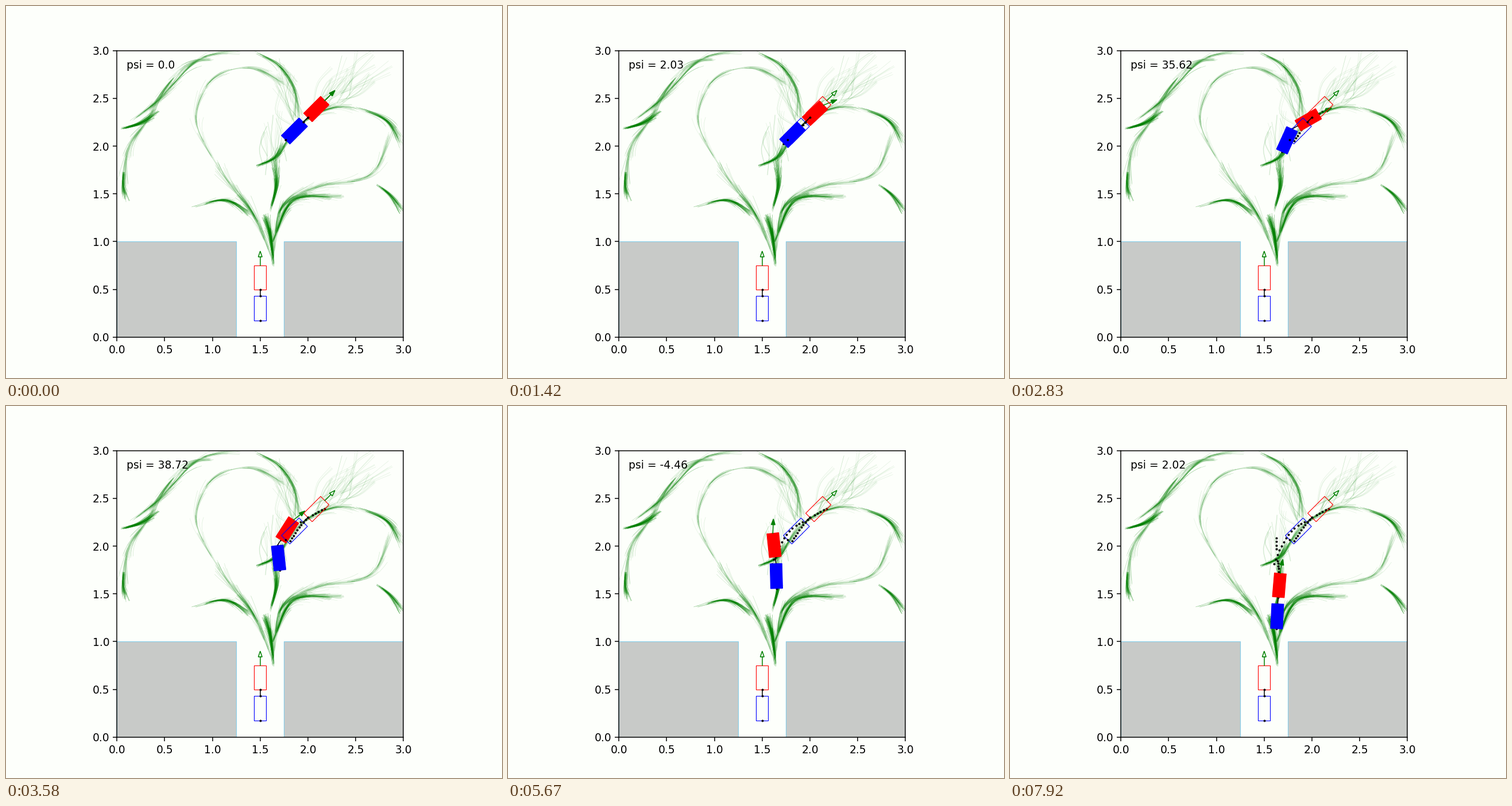
These frames come from a looping animation (864x648 px, 8 s). A matplotlib script:

```python
import numpy as np
import matplotlib.pyplot as plt
from matplotlib.animation import FuncAnimation
from matplotlib.collections import LineCollection
from matplotlib.patches import Polygon, Rectangle

FRAMES = 96
LOOP_MS = 8000
LENGTH, WIDTH = 0.25, 0.125
HITCH, TRAILER = 0.07, 0.26
DOT_GAP = 0.026
PAPER = "#fdfffb"

# Key poses: frame, rear axle x, y, then heading, psi, steering in degrees
POSES = np.array([
    (0, 2.000, 2.300, 45.0, 0.00, 0.0),
    (9, 1.814, 2.052, 60.0, -34.0, -14.0),
    (17, 1.961, 2.259, 43.0, 2.03, -21.0),
    (24, 2.175, 2.391, 21.0, 19.0, -20.0),
    (33, 1.853, 2.214, 30.0, 35.62, -6.0),
    (41, 1.730, 2.085, 56.0, 39.0, -22.0),
    (53, 1.605, 1.817, 74.0, 35.66, 12.0),
    (60, 1.625, 2.085, 91.0, 1.50, 8.0),
    (68, 1.637, 1.886, 96.0, -4.46, -8.5),
    (77, 1.650, 1.766, 97.1, -9.29, 9.0),
    (95, 1.648, 1.465, 85.2, 2.02, -4.7),
])

# Search tree: each limb is a smooth curve through a few points
ROOT = np.array([1.62, 1.0])
LIMBS = [
    [(1.64, 0.74), (1.60, 1.1), (1.55, 1.29)],
    [(1.60, 1.31), (1.67, 1.6), (1.65, 1.88)],
    [(1.63, 0.8), (1.45, 1.25), (1.06, 1.78), (0.83, 2.35), (1.0, 2.7),
     (1.38, 2.82), (1.86, 2.58)],
    [(1.63, 0.8), (1.76, 1.4), (2.08, 1.57), (2.68, 1.72), (2.88, 2.17)],
    [(1.63, 1.0), (1.85, 1.43), (2.4, 1.47)],
    [(1.62, 1.78), (1.96, 2.26), (2.3, 2.41), (2.68, 2.36)],
    [(1.46, 1.79), (1.66, 1.88), (1.78, 2.05)],
    [(2.5, 2.41), (2.84, 2.25), (3.0, 1.96)],
    [(1.42, 3.0), (1.72, 2.82), (1.87, 2.55), (1.89, 2.26)],
    [(1.14, 2.91), (0.8, 2.88), (0.5, 2.6), (0.33, 2.29), (0.13, 2.0),
     (0.06, 1.5)],
    [(0.04, 2.18), (0.4, 2.45), (0.9, 2.93), (1.35, 3.02)],
    [(0.04, 2.18), (0.24, 2.24), (0.44, 2.37)],
    [(0.07, 1.73), (0.07, 1.55), (0.11, 1.42)],
    [(0.78, 1.36), (1.15, 1.43), (1.45, 1.25)],
    [(2.72, 1.6), (2.86, 1.49), (2.99, 1.31)],
]
# Hubs of loose shoots: x, y, mean angle in degrees
HUBS = [(2.1, 2.38, 48), (2.35, 2.5, 45), (1.63, 1.8, 91), (1.88, 2.25, 105)]


def unit(angle):
    return np.array([np.cos(angle), np.sin(angle)])


def hermite(u, a, b, da, db):
    return ((2 * u**3 - 3 * u**2 + 1) * a + (3 * u**2 - 2 * u**3) * b
            + (u**3 - 2 * u**2 + u) * da + (u**3 - u**2) * db)


def pose(frame):
    """Rear axle position, heading, psi and steering (radians)."""
    i = np.searchsorted(POSES[:, 0], frame, side="right") - 1
    i = min(i, len(POSES) - 2)
    p, q = POSES[i], POSES[i + 1]
    u = (frame - p[0]) / (q[0] - p[0])
    chord = q[1:3] - p[1:3]
    d0, d1 = unit(np.radians(p[3])), unit(np.radians(q[3]))
    speed = np.hypot(*chord) * np.sign(chord @ (d0 + d1))
    pos = hermite(u, p[1:3], q[1:3], speed * d0, speed * d1)
    return (pos, *np.radians(p[3:] + u * (q[3:] - p[3:])))


def box(rear, angle, length):
    d = unit(angle)
    side = unit(angle + np.pi / 2) * WIDTH / 2
    front = rear + length * d
    return np.array([rear - side, front - side, front + side, rear + side])


class Rig:
    """Truck, trailer, coupling and steering arrow."""

    def __init__(self, ax, filled, zorder):
        def shape(color, lw):
            return ax.add_patch(Polygon(
                np.zeros((3, 2)), closed=True, ec=color, lw=lw,
                fc=color if filled else "none", zorder=zorder))

        self.trailer = shape("blue", 0.6)
        self.truck = shape("red", 0.6)
        self.head = shape("green", 0.8)
        below = zorder - 0.5 if filled else zorder + 0.5
        self.stem, = ax.plot([], [], color="green", lw=0.8, zorder=zorder)
        self.link, = ax.plot([], [], color="black", lw=0.8, zorder=below)
        self.pins, = ax.plot([], [], "o", color="black", ms=2.1, mew=0,
                             zorder=below)

    def place(self, pos, heading, psi, steer):
        joint = pos - HITCH * unit(heading)
        tail = joint - TRAILER * unit(heading + psi)
        self.truck.set_xy(box(pos, heading, LENGTH))
        self.trailer.set_xy(box(tail, heading + psi, TRAILER))
        self.link.set_data(*np.array([pos, joint]).T)
        self.pins.set_data(*np.array([pos, joint, tail]).T)

        base = pos + LENGTH * unit(heading)
        d = unit(heading + steer)
        side = 0.02 * unit(heading + steer + np.pi / 2)
        neck = base + 0.09 * d
        self.stem.set_data(*np.array([base, neck]).T)
        self.head.set_xy([neck - side, base + 0.15 * d, neck + side])


class Curve:
    """Smooth curve through points, sampled by length."""

    def __init__(self, points):
        p = np.array(points, float)
        knots = np.append(0, np.cumsum(np.hypot(*np.diff(p, axis=0).T)))
        slope = np.gradient(p, knots, axis=0)
        self.s = np.linspace(0, knots[-1], 120)
        i = np.minimum(np.searchsorted(knots, self.s, side="right") - 1,
                       len(p) - 2)
        step = (knots[i + 1] - knots[i])[:, None]
        u = (self.s - knots[i])[:, None] / step
        self.xy = hermite(u, p[i], p[i + 1], slope[i] * step,
                          slope[i + 1] * step)
        self.length = knots[-1]

    def at(self, s):
        return np.stack([np.interp(s, self.s, c) for c in self.xy.T], axis=-1)


def strand(rng, curve, start, reach, spread):
    """One thin path that follows the curve and bends away from it."""
    u = np.linspace(0, 1, 9)[:, None]
    pts = curve.at(start + reach * u[:, 0])
    slope = np.gradient(pts, axis=0)
    normal = slope[:, ::-1] * (-1, 1) / (np.hypot(*slope.T)[:, None] + 1e-9)
    drift = rng.normal(0, 0.006) + rng.normal(0, spread) * reach * u**1.5
    return pts + drift * normal


def draw_tree(ax):
    rng = np.random.default_rng(11)
    lines, alphas = [], []
    for curve in map(Curve, LIMBS):
        weight = min(1, 0.5 / curve.length)
        for _ in range(int(8 + 9 * curve.length)):
            reach = min(rng.uniform(0.2, 0.45), 0.7 * curve.length)
            start = rng.uniform(0, curve.length - reach)
            near = np.exp(-np.hypot(*(curve.at(start) - ROOT)) / 0.4)
            dark = 0.1 + (0.45 * weight + 0.2 * near) * rng.random()**1.5
            for _ in range(int(5 + 5 * near)):
                at = start + rng.uniform(-0.03, 0.03)
                lines.append(strand(rng, curve, max(at, 0), reach, 0.07))
                alphas.append(dark)
    for x, y, mean in HUBS:
        for _ in range(10):
            angle = np.radians(mean + rng.normal(0, 13))
            foot = np.array([x, y]) + rng.normal(0, 0.05, 2)
            tip = foot + rng.uniform(0.3, 0.65) * unit(angle)
            bend = rng.normal(0, 0.04) * unit(angle + np.pi / 2)
            curve = Curve([foot, (foot + tip) / 2 + bend, tip])
            for _ in range(3):
                lines.append(strand(rng, curve, 0, curve.length, 0.04))
                alphas.append(0.12)
    colors = [(0, 0.5, 0, a) for a in alphas]
    ax.add_collection(LineCollection(lines, colors=colors, linewidths=0.33,
                                     zorder=1))


def trail_dots():
    """A dot per frame, skipped where one already lies too close."""
    frames, dots = [0], [pose(0)[0]]
    for k in range(1, FRAMES):
        pos = pose(k)[0]
        if np.hypot(*(np.array(dots) - pos).T).min() > DOT_GAP:
            frames.append(k)
            dots.append(pos)
    return np.array(frames), np.array(dots)


fig, ax = plt.subplots(figsize=(6.4, 4.8), dpi=135, facecolor=PAPER)
ax.set_facecolor(PAPER)
ax.set_aspect("equal")
for left in (0, 1.75):
    ax.add_patch(Rectangle((left, 0), 1.25, 1, fc="#c8cac8", ec="skyblue",
                           lw=0.6, zorder=0.8))
draw_tree(ax)

trail, = ax.plot([], [], "o", color="black", ms=2.1, mew=0, zorder=2)
label = ax.text(0.1, 2.81, "")
start, goal = Rig(ax, False, 4), Rig(ax, False, 4)
start.place(np.array([2.0, 2.3]), np.pi / 4, 0, 0)
goal.place(np.array([1.5, 0.5]), np.pi / 2, 0, 0)
rig = Rig(ax, True, 3)

ticks = np.arange(0, 3.1, 0.5)
ax.set(xlim=(0, 3), ylim=(0, 3), xticks=ticks, yticks=ticks)
dot_frames, dots = trail_dots()


def update(frame):
    state = pose(frame)
    rig.place(*state)
    trail.set_data(*dots[dot_frames <= frame].T)
    psi = round(float(np.degrees(state[2])), 2)
    label.set_text(f"psi = {psi}")
    return trail, label


anim = FuncAnimation(fig, update, frames=FRAMES, interval=LOOP_MS / FRAMES,
                     repeat=True, repeat_delay=0)
plt.show()
```
